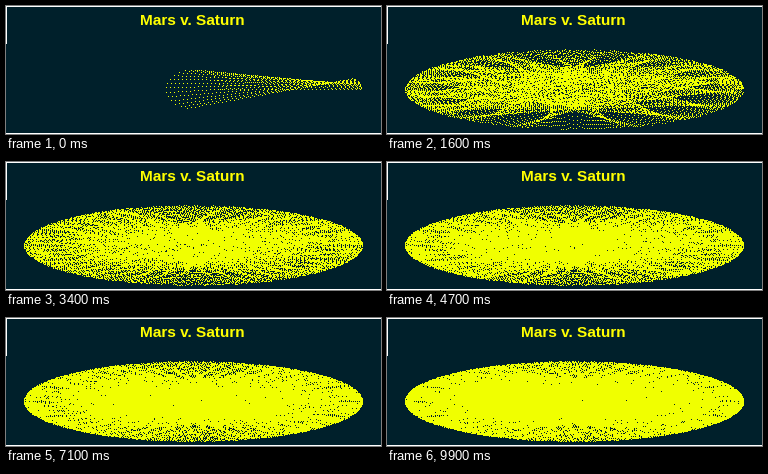
Animation of 375x128 px, one loop 10000 ms. Source, as a matplotlib script:

```python
import numpy as np
import matplotlib.pyplot as plt
from matplotlib.animation import FuncAnimation

W, H, DPI = 375, 128, 100
FRAMES, INTERVAL = 100, 100
CX, CY = 187, 83
MARS_R = (27, 19.5)
SATURN_R = (169.5, 40)
PERIOD_RATIO = 10759 / 687
MARS_STEP = np.radians(13.5)
FIRST_LINES, LINES = 20, 41    # lines in the opening frame, then per frame
DOT_GAP = 4
NIGHT, YELLOW, WHITE = (0, 32, 43), (240, 255, 0), (255, 255, 255)


def orbit(radii, angle):
    return np.array([CX + radii[0] * np.cos(angle),
                     CY - radii[1] * np.sin(angle)])


def birth_map():
    """Frame in which each pixel first gets a dot."""
    born = np.full((H, W), FRAMES)
    for n in range(FIRST_LINES + LINES * (FRAMES - 1)):
        frame = max(0, (n - FIRST_LINES) // LINES + 1)
        angle = n * MARS_STEP
        mars = orbit(MARS_R, angle)
        saturn = orbit(SATURN_R, angle / PERIOD_RATIO)
        span = saturn - mars
        length = np.hypot(*span)
        along = np.arange(0, length, DOT_GAP) / length
        x, y = np.rint(mars[:, None] + span[:, None] * along).astype(int)
        np.minimum.at(born, (y, x), frame)
    return born


born = birth_map()


def picture(i):
    img = np.empty((H, W, 3), np.uint8)
    img[:] = NIGHT
    img[[0, -1]] = WHITE
    img[:38, 0] = WHITE
    img[born <= i] = YELLOW
    return img


fig = plt.figure(figsize=(W / DPI, H / DPI), dpi=DPI)
ax = fig.add_axes([0, 0, 1, 1])
ax.axis("off")
canvas = ax.imshow(picture(0), extent=(0, W, H, 0), aspect="auto",
                   interpolation="nearest")
ax.text(186.5, 19, "Mars v. Saturn", color="#ffff00", ha="center",
        va="baseline", family="Liberation Sans", weight="bold",
        size=15.4 * 72 / DPI)


def update(i):
    canvas.set_data(picture(i))
    return canvas,


anim = FuncAnimation(fig, update, frames=FRAMES, interval=INTERVAL,
                     repeat=True, repeat_delay=0)
plt.show()
```
